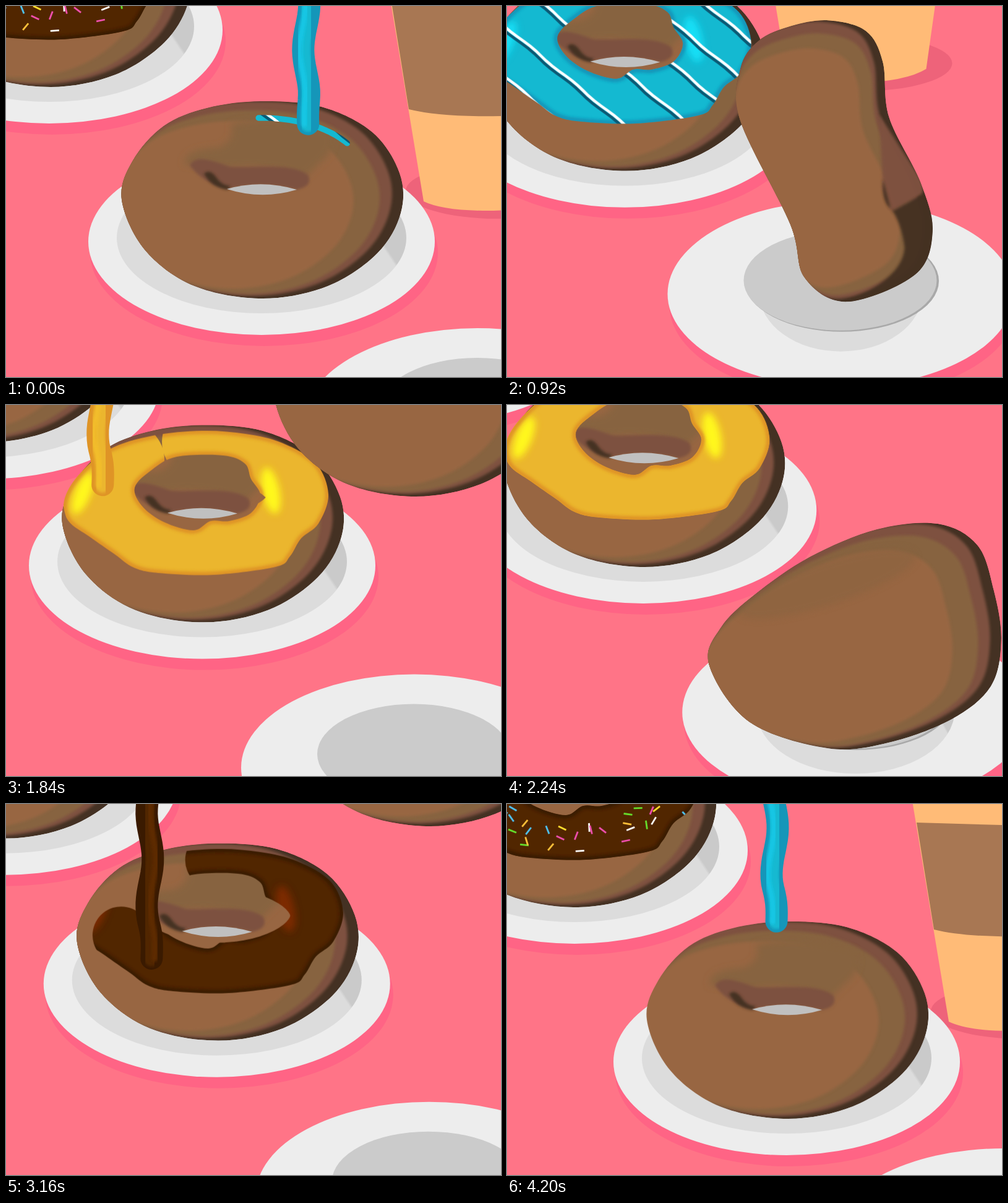
Recreate the animation shown at these times as an HTML page. Size 800 px wide and 600 px high, loop 4240 ms.

```html
<!DOCTYPE html>
<html lang="en">
<head>
<meta charset="utf-8">
<title>Donuts</title>
<style>
html, body { margin: 0; width: 100%; height: 100%; overflow: hidden; background: #ff7487; }
svg { display: block; width: 100vw; height: 100vh; }
</style>
</head>
<body>
<svg viewBox="0 0 800 600" preserveAspectRatio="xMidYMid slice">
  <defs>
    <filter id="soft" x="-20%" y="-20%" width="140%" height="140%"><feGaussianBlur stdDeviation="2.2"/></filter>
    <filter id="softer" x="-60%" y="-60%" width="220%" height="220%"><feGaussianBlur stdDeviation="6"/></filter>
    <linearGradient id="plateShade" x1="0" y1=".6" x2="1" y2=".25">
      <stop offset=".83" stop-color="#dcdcdc"/><stop offset=".84" stop-color="#cacaca"/>
    </linearGradient>
  </defs>
  <defs id="icings"></defs>
  <g id="scene"></g>
</svg>
<script>
const LOOP = 4240, STEP = 40, SPEED = 9.674;
const scene = document.getElementById('scene');
const clamp = (v, a = 0, b = 1) => Math.min(b, Math.max(a, v));
const mix = (a, b, k) => a + (b - a) * k;
const mixPose = (a, b, k) => a.map((p, i) => [mix(p[0], b[i][0], k), mix(p[1], b[i][1], k)]);
const pairs = text => text.trim().split(/\s+/).map(p => p.split(',').map(Number));
const line = pts => 'M' + pts.map(p => p.map(v => v.toFixed(1))).join('L');
const near = (x, centre, reach) => clamp(1 - Math.abs(x - centre) / reach);

// Closed Catmull-Rom curve through the points
function blob(pts) {
  const n = pts.length, at = i => pts[(i + n) % n];
  let d = 'M' + pts[0];
  for (let i = 0; i < n; i++) {
    const [a, b, c, e] = [at(i - 1), at(i), at(i + 1), at(i + 2)];
    const c1 = b.map((v, j) => (v + (c[j] - a[j]) / 6).toFixed(1));
    const c2 = c.map((v, j) => (v - (e[j] - b[j]) / 6).toFixed(1));
    d += `C${c1} ${c2} ${c}`;
  }
  return d + 'Z';
}

function random(seed) {
  return () => (seed = (seed * 16807) % 2147483647) / 2147483647;
}

// Outlines relative to the plate centre, clockwise from the left
const rest = pairs('-226,-68 -208,-131 -158,-187 -88,-216 -1,-227 97,-218 179,-177 223,-111 225,-46 187,19 107,72 2,92 -108,72 -188,14');
const stretch = pairs('-250,-74 -232,-158 -209,-213 -147,-256 -7,-281 113,-269 193,-238 225,-173 228,-88 208,-8 133,37 13,58 -87,51 -190,14');
const tilt = pairs('-239,-70 -219,-130 -164,-183 -74,-245 36,-291 136,-301 201,-267 228,-195 239,-115 221,-40 156,13 56,50 -44,61 -174,20');
const upright = pairs('-162,-282 -162,-366 -133,-411 -80,-435 -20,-444 40,-427 67,-377 77,-287 128,-182 148,-102 120,-32 10,12 -58,-27 -81,-114');
const above = rest.map(([x, y]) => [x, y - 720]);

// Pose by horizontal plate position
const poses = [[700, above], [622, rest], [587, stretch], [564, tilt], [540, upright], [470, rest]];

function poseAt(x) {
  if (x <= 470) return rest;
  const i = poses.findIndex((p, j) => x <= p[0] && x > poses[j + 1][0]);
  const [[x0, a], [x1, b]] = [poses[i], poses[i + 1]];
  const k = (x0 - x) / (x0 - x1);
  return mixPose(a, b, i === 0 ? k * k : k);
}

const icingOuter = blob(pairs('-223,-105 -216,-72 -181,-46 -141,-18 -111,3 -71,12 19,15 119,2 142,-15 160,-44 188,-68 204,-115 184,-165 130,-198 70,-213 0,-218 -80,-210 -150,-188 -200,-146'));
const icingHole = blob(pairs('-109,-126 -81,-155 -41,-176 34,-178 69,-165 79,-140 94,-114 79,-85 44,-72 14,-72 -14,-57 -61,-70 -96,-95'));
const icingShape = icingOuter + icingHole;

const flavours = [
  { edge: '#1596b9', base: '#14b9d1', light: '#14dff6', core: '#14c6e4' },
  { edge: '#df9426', base: '#ebb62e', light: '#fff81c', core: '#f2bd2b' },
  { edge: '#3a1a00', base: '#512600', light: '#7d2b02', core: '#5d2b00' }
];

function stripes() {
  const starts = [-290, -191, -86, 7, 89, 177];
  const out = starts.map((start, i) => {
    const pts = [];
    for (let y = -230; y <= 30; y += 8)
      pts.push([start + (y + 140) * 1.21 + 1.8 * Math.sin(y / 9 + i), y]);
    return `<path d="${line(pts)}" transform="translate(-3 4)" stroke="#0c5873" stroke-width="4.5"/>
      <path d="${line(pts)}" stroke="#fff" stroke-width="4.5"/>`;
  });
  return `<g fill="none">${out.join('')}</g>`;
}

function sprinkles() {
  const rnd = random(77), colours = ['#ffe02e', '#f04fae', '#4fc3f2', '#66df2c', '#fff', '#ffc23a'];
  let out = '';
  for (let i = 0; i < 82; i++) {
    const a = rnd() * 6.283, r = mix(.76, 1.24, rnd()), turn = rnd() * 3.14;
    const x = 165 * r * Math.sin(a), y = -110 - 90 * r * Math.cos(a);
    const dx = 7 * Math.cos(turn), dy = 7 * Math.sin(turn);
    out += `<path d="${line([[x - dx, y - dy], [x + dx, y + dy]])}" stroke="${colours[i % 6]}"/>`;
  }
  return `<g stroke-width="2.8">${out}</g>`;
}

document.getElementById('icings').innerHTML =
  `<clipPath id="icingClip"><path d="${icingShape}" clip-rule="evenodd"/></clipPath>` +
  flavours.map((f, i) => `<g id="icing${i}" clip-path="url(#icingClip)">
    <path d="${icingShape}" fill="${f.base}" fill-rule="evenodd"/>
    <g filter="url(#softer)" fill="${f.light}">
      <ellipse rx="13" ry="36" transform="translate(-193 -117) rotate(22)"/>
      <ellipse rx="14" ry="38" transform="translate(111 -121) rotate(-12)"/></g>
    <path d="${icingShape}" fill="none" stroke="${f.edge}" stroke-width="11" filter="url(#soft)"/>
    ${i === 0 ? stripes() : ''}</g>`).join('') +
  `<g id="sprinkles" clip-path="url(#icingClip)">${sprinkles()}</g>`;

const ring = a => [165 * Math.sin(a), -110 - 90 * Math.cos(a)];

function pourAngle(u) {
  if (u < 1.5) return -.1;
  return u < 4 ? -.1 + .09 * (u - 1.5) ** 2 : Math.min(6.283, .46 + .45 * (u - 4));
}

function icing(id, kind, u) {
  if (u < 1.2) return '';
  const top = kind === 2 && u > 16 ? `<use href="#sprinkles" opacity="${clamp((u - 16) / 3)}"/>` : '';
  if (u > 19) return `<use href="#icing${kind}"/>${top}`;
  const a = pourAngle(u), end = a + Math.min(.52, .25 + .6 * Math.max(a, 0));
  const pts = [];
  for (let i = 0; i <= 40; i++) pts.push(ring(mix(-.03, end, i / 40)));
  const width = u < 4 ? 5 + u : 9 + 145 * clamp((u - 4) / 13);
  return `<mask id="spread${id}" maskUnits="userSpaceOnUse" x="-260" y="-260" width="520" height="320">
    <path d="${line(pts)}" fill="none" stroke="#fff" stroke-width="${width}" stroke-linecap="round" stroke-linejoin="round"/></mask>
    <g mask="url(#spread${id})"><use href="#icing${kind}"/></g>${top}`;
}

function stream(kind, x, y, u) {
  if (u < -2.5 || u > 19.5) return '';
  const [tx, ty] = ring(pourAngle(u)), f = flavours[kind];
  const tipX = x + tx, tipY = y + ty - Math.max(0, .25 - u) * 110;
  const start = mix(-40, tipY, clamp((u - 17) / 2.5));
  const trail = shift => {
    const pts = [];
    for (let s = start; s < tipY; s += 8) {
      const rise = clamp((tipY - s) / 60);
      pts.push([tipX + shift + rise * (5 * Math.sin(s / 24 + u * 2) - 3), s]);
    }
    return line([...pts, [tipX + shift, tipY]]);
  };
  const side = kind === 2 ? 5 : -6;
  return `<g fill="none" stroke-linecap="round" stroke-linejoin="round">
    <path d="${trail(0)}" stroke="${f.edge}" stroke-width="36"/>
    <path d="${trail(0)}" stroke="${f.base}" stroke-width="25" filter="url(#soft)"/>
    <path d="${trail(side)}" stroke="${f.core}" stroke-width="10" filter="url(#soft)"/></g>`;
}

function plate(x) {
  const landed = x < 470 ? 1 : x > 622 ? clamp((690 - x) / 68) : x > 540 ? mix(.56, 1, (x - 540) / 82) : mix(.56, 1, (540 - x) / 70);
  return `<ellipse cx="4" cy="18" rx="281" ry="151" fill="#ff6485"/>
    <ellipse rx="280" ry="151" fill="#ededed"/>
    <ellipse cy="${mix(3, -6, landed)}" rx="${234 * landed}" ry="${mix(60, 122, landed)}" fill="url(#plateShade)" opacity="${landed ? 1 : 0}"/>
    <ellipse cx="1.5" cy="-21" rx="157" ry="82" fill="#a9a9a9" opacity="${x < 622 ? 1 : 0}"/>
    <ellipse cx="-1" cy="-22" rx="156" ry="81" fill="#cbcbcb"/>`;
}

// Scale, shift and colour of each tone, lit from the lower left
const bands = [[.985, -12, -3, '#7e5141'], [.93, -9, -2, '#87633f'], [.85, -18, -4, '#986642']];

function donut(id, x) {
  if (x >= 700) return '';
  const pose = poseAt(x), d = blob(pose), [ax, ay] = pose[13];
  const settled = clamp((494 - x) / 22);
  const layers = bands.map(([s, dx, dy, colour]) =>
    `<path d="${d}" fill="${colour}" transform="translate(${ax + dx} ${ay + dy}) scale(${s}) translate(${-ax} ${-ay})" filter="url(#soft)"/>`).join('');
  return `<clipPath id="body${id}"><path d="${d}"/></clipPath>
    <g clip-path="url(#body${id})"><path d="${d}" fill="#443123"/>${layers}
      <ellipse cx="20" cy="-212" rx="150" ry="34" transform="rotate(${x < 576 ? -18 : 0})" fill="#87633f" filter="url(#softer)" opacity="${near(x, 577, 28)}"/>
      <ellipse cx="28" cy="-190" rx="24" ry="8" fill="#7e5141" filter="url(#soft)" opacity="${near(x, 587, 20)}"/>
      <g opacity="${near(x, 540, 20)}">
        <path d="M62-290L122-197Q142-165 125-157L85-132Q68-150 68-180Z" fill="#7e5141" filter="url(#soft)"/>
        <path d="M68-185Q66-145 85-135L130-160L160-107L130-20L60 20L5 14Q100-25 103-75Q98-115 80-140Z" fill="#443123" filter="url(#soft)"/>
      </g>
      <g opacity="${settled}">
        <path d="M-50-190Q20-207 110-180Q125-150 92-125L70-103Q0-128-60-118L-125-125Q-125-150-70-152Q-40-165-50-190Z" fill="#87633f" filter="url(#softer)"/>
        <path d="M-116-124C-104-142-78-130-50-121C-10-119 50-128 75-108Q84-90 57-84Q0-98-55-85Q-100-98-116-124Z" fill="#7d5141" filter="url(#soft)"/>
        <path d="M-93-110Q-84-118-74-105Q-64-90-50-90L-55-84Q-82-88-93-110Z" fill="#443123" filter="url(#soft)"/>
        <path d="M-56-85Q0-101 57-84Q0-67-56-85Z" fill="#c0c0c0"/>
      </g></g>`;
}

function cup(x, y) {
  return `<g transform="translate(${x} ${y})">
    <ellipse cx="381" cy="-82" rx="148" ry="45" fill="#ee637a"/>
    <path d="M157-700L262-65Q295-49 375-50Q455-53 487-73L575-700Z" fill="#ffbb77"/>
    <path d="M210-387L238-214Q290-201 387-203Q460-205 505-218L531-387Q460-381 348-383Z" fill="#a87753"/></g>`;
}

const spots = [[0, 0], [349, 291], [692, 618]];

function draw(time) {
  const n = Math.floor((time % LOOP) / STEP);
  // The belt slows over the last stretch and catches up at the loop point
  const late = clamp((n - 89) / 16) * 16;
  const px = 413 - SPEED * (n - late) - late * 135 / 16;
  const py = 381 - 8.966 * (n - late) - late * 126 / 16;
  let floor = cup(px, py) + cup(px + 1035, py + 960), pours = '';
  for (let i = -1; i < 5; i++) {
    const kind = (i + 3) % 3, lap = Math.floor(i / 3);
    const x = px + spots[kind][0] + lap * 1035, y = py + spots[kind][1] + lap * 960;
    const u = (452 - x) / SPEED;
    floor += `<g transform="translate(${x} ${y})">${plate(x)}${donut(i + 1, x)}${icing(i + 1, kind, u)}</g>`;
    pours += stream(kind, x, y, u);
  }
  scene.innerHTML = `<rect width="800" height="600" fill="#ff7487"/>${floor}${pours}`;
}

const began = performance.now();
function tick() {
  draw(performance.now() - began);
  requestAnimationFrame(tick);
}
tick();
</script>
</body>
</html>
```
